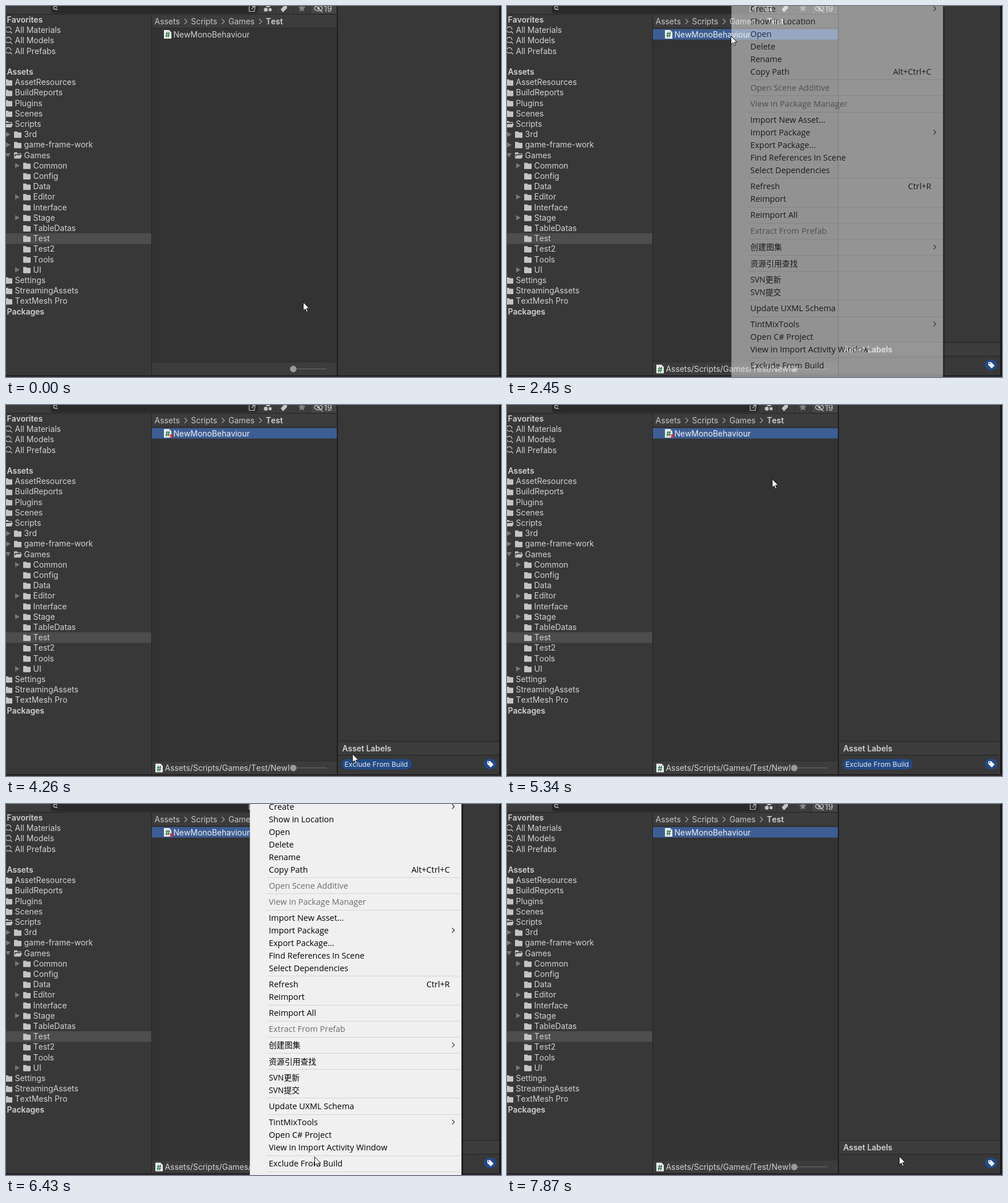
These frames come from a looping animation (865x648 px, 7990 ms). An HTML page with a canvas:

```html
<!DOCTYPE html>
<html lang="en">
<head>
<meta charset="utf-8">
<title>Exclude From Build</title>
<style>
  html, body { margin: 0; width: 100%; height: 100%; overflow: hidden; background: #383838; }
  canvas { display: block; }
</style>
</head>
<body>
<canvas id="stage" width="865" height="648"></canvas>
<script>
const LOOP = 7990, STEP = 120;
const stage = document.getElementById('stage');
const screen2d = stage.getContext('2d');
const menuLayer = document.createElement('canvas');
menuLayer.width = stage.width;
menuLayer.height = stage.height;
const menu2d = menuLayer.getContext('2d');
let g = screen2d;

const UI = '13.9px Inter, sans-serif';
const UI_BOLD = '600 13.9px Inter, sans-serif';
const MENU = '14.4px "Open Sans", "Noto Sans", sans-serif';
const MENU_CJK = '13.8px "Open Sans", "Noto Sans CJK SC", "Noto Sans CJK JP", sans-serif';
const TEXT = '#d2d2d2', ICON = '#c4c4c4', EDGE = '#232323', BAR = '#3c3c3c', BLUE = '#214a88';

// Drawing helpers
function rect(x, y, w, h, color) {
  g.fillStyle = color;
  g.fillRect(x, y, w, h);
}
function pill(x, y, w, h, radius, color) {
  g.fillStyle = color;
  g.beginPath();
  g.roundRect(x, y, w, h, radius);
  g.fill();
}
function disc(x, y, r, color) {
  pill(x - r, y - r, 2 * r, 2 * r, r, color);
}
function shape(path, x, y, fill, stroke, width = 1) {
  const outline = new Path2D(path);
  g.save();
  g.translate(x, y);
  if (fill) {
    g.fillStyle = fill;
    g.fill(outline);
  }
  if (stroke) {
    g.strokeStyle = stroke;
    g.lineWidth = width;
    g.stroke(outline);
  }
  g.restore();
}
// y is the vertical middle of the capitals
function label(str, x, y, color = TEXT, font = UI, align = 'left') {
  g.font = font;
  g.fontKerning = 'none';
  g.textAlign = align;
  g.fillStyle = color;
  g.fillText(str, x, y + 5);
}
function chevron(x, y, size, color, width) {
  shape(`M0 ${-size}l${size} ${size}l${-size} ${size}`, x, y, null, color, width);
}

// Icons
function magnifier(x, y, r) {
  const d = r * 0.7;
  shape(`M${r} 0A${r} ${r} 0 1 0 ${d} ${d}l${d} ${d}`, x, y, null, ICON, 1.3);
}
function folder(x, y, open) {
  rect(x, y - 5, 6, 3, ICON);
  if (!open) return pill(x, y - 3.5, 13, 9.5, 1, ICON);
  shape('M.6 5v-7.6h11v3', x, y, null, ICON, 1.2);
  shape('M3 0h11l-2.5 6h-11.5z', x, y, ICON);
}
function script(x, y, excluded) {
  shape('M0-7.5h9l4 4v11h-13z', x, y, '#f0f0f0');
  label('#', x + 6.5, y + 0.5, '#2c7a45', '700 13px Inter, sans-serif', 'center');
  if (excluded) shape('M-2.5-2.5l5 5m0-5l-5 5', x + 13, y + 4.5, null, '#e0202c', 1.8);
}
function tag(x, y, color, hole) {
  shape('M-5-5h5l6 6l-5 5l-6-6z', x, y, color);
  disc(x - 2.8, y - 2.8, 1.1, hole);
}
function star(x, y, r, color) {
  g.fillStyle = color;
  g.beginPath();
  for (let i = 0; i < 10; i++) {
    const a = i * Math.PI / 5, d = i % 2 ? r * 0.45 : r;
    g.lineTo(x + d * Math.sin(a), y - d * Math.cos(a));
  }
  g.fill();
}

// Project tree: "depth|marks|name"; marks: + collapsed, - expanded, o open folder, ? search, * heading
const TREE = `0|*|Favorites
0|?|All Materials
0|?|All Models
0|?|All Prefabs
0|*|
0|*|Assets
0||AssetResources
0||BuildReports
0||Plugins
0||Scenes
0|o|Scripts
1|+|3rd
1|+|game-frame-work
1|-o|Games
2|+|Common
2||Config
2||Data
2|+|Editor
2||Interface
2|+|Stage
2||TableDatas
2||Test
2||Test2
2||Tools
2|+|UI
0||Settings
0||StreamingAssets
0||TextMesh Pro
0|*|Packages`.split('\n').map(row => row.split('|'));

function drawTree() {
  TREE.forEach(([depth, marks, name], i) => {
    const y = 24 + i * 18.2, x = depth * 16;
    if (marks === '*') return label(name, 1.5, y, TEXT, UI_BOLD);
    if (name === 'Test') rect(0, y - 9.3, 254, 18.6, '#4d4d4d');
    if (marks === '?') magnifier(4, y - 1, 4.8);
    else folder(x - 2, y, marks.includes('o'));
    if (marks === '+') shape('M0-4.5l8 4.5l-8 4.5z', x - 16, y, '#777');
    if (marks[0] === '-') shape('M0-3.5h9l-4.5 7.5z', x - 17, y, '#777');
    label(name, x + 15.6, y);
  });
}

function drawToolbar() {
  rect(0, 0, 578, 14, BAR);
  pill(78, -10, 362, 23, 5, '#2a2a2a');
  magnifier(86, 3, 2.8);
  shape('M0 0v9h9v-4M4 5l5-5M5 0h5v5', 425, 0.5, null, ICON, 1.2);
  disc(454, 6.5, 3.4, ICON);
  rect(459, 4, 5, 5, ICON);
  shape('M-4 2l4-6l4 6z', 458, 0, ICON);
  shape('M-5 5l6-7h5v5l-7 7z', 485, 1, ICON);
  star(517, 4, 7, '#858585');
  rect(533, 0, 44, 13, '#464646');
  shape('M-7 0a7 4.5 0 0 1 14 0a7 4.5 0 0 1-14 0M-6-6l13 13', 546, 4, null, ICON, 1.4);
  disc(546, 4, 2.2, ICON);
  label('19', 555.5, 4.5);
  for (let x = 441; x < 540; x += 30.4) rect(Math.round(x), 0, 1, 13, '#303030');
  rect(0, 14, 578, 1, EDGE);
}

function drawBreadcrumb() {
  let x = 259.6;
  for (const part of ['Assets', 'Scripts', 'Games']) {
    label(part, x, 27, '#c6c6c6');
    x += g.measureText(part).width;
    chevron(x + 8, 27, 4.5, '#a0a0a0', 1.3);
    x += 19.5;
  }
  label('Test', x, 27, TEXT, UI_BOLD);
}

function drawBrowser(state) {
  rect(255, 15, 323, 630, '#333333');
  rect(255, 15, 323, 23, BAR);
  rect(255, 38, 323, 1, '#292929');
  rect(255, 623, 323, 22, BAR);
  drawBreadcrumb();

  if (state.selected) rect(255, 40.3, 323, 18.3, '#3d5e94');
  script(276, 49.5, state.excluded);
  label('NewMonoBehaviour', 292.4, 49.5, state.selected ? '#f0f0f0' : TEXT);

  if (state.details) {
    script(261, 634, false);
    g.save();
    g.beginPath();
    g.rect(255, 623, 240, 22);
    g.clip();
    label('Assets/Scripts/Games/Test/NewMonoBehaviour', 277.5, 634);
    g.restore();
  }
  rect(502, 633, 58, 1.5, '#5e5e5e');
  disc(502, 634, 5.7, '#999');
}

function drawInspector(state) {
  if (!state.details) return;
  rect(580, 587, 282, 24, BAR);
  rect(580, 587, 282, 1, EDGE);
  rect(580, 611, 282, 1, EDGE);
  label('Asset Labels', 587.5, 600, TEXT, UI_BOLD);
  pill(835, 618, 22, 18, 9, BLUE);
  tag(846, 627, '#f4f4f4', BLUE);
  if (state.excluded) {
    pill(586.5, 618.5, 122.5, 18, 9, BLUE);
    label('Exclude From Build', 591.5, 627.3, '#e8e8e8', '12.2px Inter, sans-serif');
  }
}

function drawEditor(state) {
  rect(0, 0, 865, 648, '#383838');
  drawTree();
  drawToolbar();
  drawBrowser(state);
  rect(254, 15, 1, 630, EDGE);
  rect(578, 0, 2, 645, '#1e1e1e');
  drawInspector(state);
  rect(862, 0, 3, 648, '#161616');
  rect(0, 645, 865, 2, '#1f1f1f');
  rect(0, 647, 865, 1, '#3c3338');
}

// Context menu: "-" prefix starts a group, "~" is disabled, ">" opens a submenu, "|" precedes a shortcut
const MENU_ITEMS = `Create>
Show in Location
Open
Delete
Rename
Copy Path|Alt+Ctrl+C
-~Open Scene Additive
-~View in Package Manager
-Import New Asset...
Import Package>
Export Package...
Find References In Scene
Select Dependencies
-Refresh|Ctrl+R
Reimport
-Reimport All
-~Extract From Prefab
-创建图集>
-资源引用查找
-SVN更新
SVN提交
-Update UXML Schema
-TintMixTools>
Open C# Project
View in Import Activity Window
-Exclude From Build`.split('\n');

function drawMenu(left, [px, py]) {
  g = menu2d;
  g.clearRect(0, 0, 865, 648);
  rect(left + 370, 0, 3, 648, 'rgba(0,0,0,0.4)');
  rect(left, 0, 370, 648, '#ccc');
  rect(left + 1, 0, 368, 648, '#f0f0f0');
  const separator = y => rect(left + 30, Math.round(y), 338, 1, '#d5d5d5');
  let y = 5;
  MENU_ITEMS.forEach((item, i) => {
    if (i) y += 21.9;
    if (item[0] === '-') {
      separator(y - 8.2);
      y += 6.3;
    }
    const disabled = item.includes('~');
    const [name, shortcut] = item.replace(/^-?~?/, '').replace('>', '').split('|');
    const hovered = px > left + 3 && Math.abs(py - y) < 11;
    if (hovered && !disabled) rect(left + 3, Math.round(y - 11), 365, 22, '#91c9f7');
    const font = /[\u4e00-\u9fff]/.test(name) ? MENU_CJK : MENU;
    label(name, left + 33.3, y, disabled ? '#6d6d6d' : '#000', font);
    if (shortcut) label(shortcut, left + 349.5, y, '#000', MENU, 'right');
    if (item.endsWith('>')) chevron(left + 353.5, y - 0.5, 4, '#222', 1.1);
  });
  separator(y + 13.7);
  g = screen2d;
}

// Each move starts where the one before ended; "via" bends it into an arc
const START = [519, 517];
const MOVES = [
  { from: 250, until: 1150, to: [391, 52] },
  { from: 2450, until: 3170, to: [492, 631] },
  { from: 3540, until: 4260, to: [605, 609] },
  { from: 4260, until: 4980, to: [530, 277], via: [850, 700] },
  { from: 4980, until: 5580, to: [426, 49] },
  { from: 5830, until: 6430, to: [539, 616] },
  { from: 6550, until: 7390, to: [592, 622] },
  { from: 7390, until: 7870, to: [685, 615], via: [600, 534] }
];

function pointerAt(t) {
  let at = START;
  for (const { from, until, to, via } of MOVES) {
    if (t <= from) break;
    const p = Math.min(1, (t - from) / (until - from));
    const e = p * p * (3 - 2 * p);
    const origin = at;
    at = to.map((end, axis) => {
      const bend = via ? via[axis] : (origin[axis] + end) / 2;
      return Math.round((1 - e) ** 2 * origin[axis] + 2 * e * (1 - e) * bend + e * e * end);
    });
  }
  return at;
}

function drawPointer([x, y]) {
  shape('M0 0v14.5l3.4-3l2.4 5.5l2.2-1l-2.3-5.3h4.7z', x + 0.5, y + 0.5, '#fff', '#111');
}

const RUNS = [0, 370, 1220, 2450, 3420, 5830];
const MENUS = [
  { left: 392, from: 2450, until: 3420, firstAlpha: 0.5 },
  { left: 426, from: 5830, until: 6670, firstAlpha: 0.32 }
];

function draw(time) {
  const run = RUNS.findLast(start => start <= time);
  const t = run + Math.floor((time - run) / STEP) * STEP;
  const pointer = pointerAt(t);
  drawEditor({
    selected: t >= 1340,
    details: t >= 1460,
    excluded: t >= 3540 && t < 6790
  });
  const menu = MENUS.find(m => t >= m.from && t < m.until);
  if (menu) {
    drawMenu(menu.left, pointer);
    g.globalAlpha = t < menu.from + STEP ? menu.firstAlpha : 1;
    g.drawImage(menuLayer, 0, 0);
    g.globalAlpha = 1;
  }
  drawPointer(pointer);
}

const started = performance.now();
function tick() {
  draw((performance.now() - started) % LOOP);
  requestAnimationFrame(tick);
}
tick();
</script>
</body>
</html>
```
